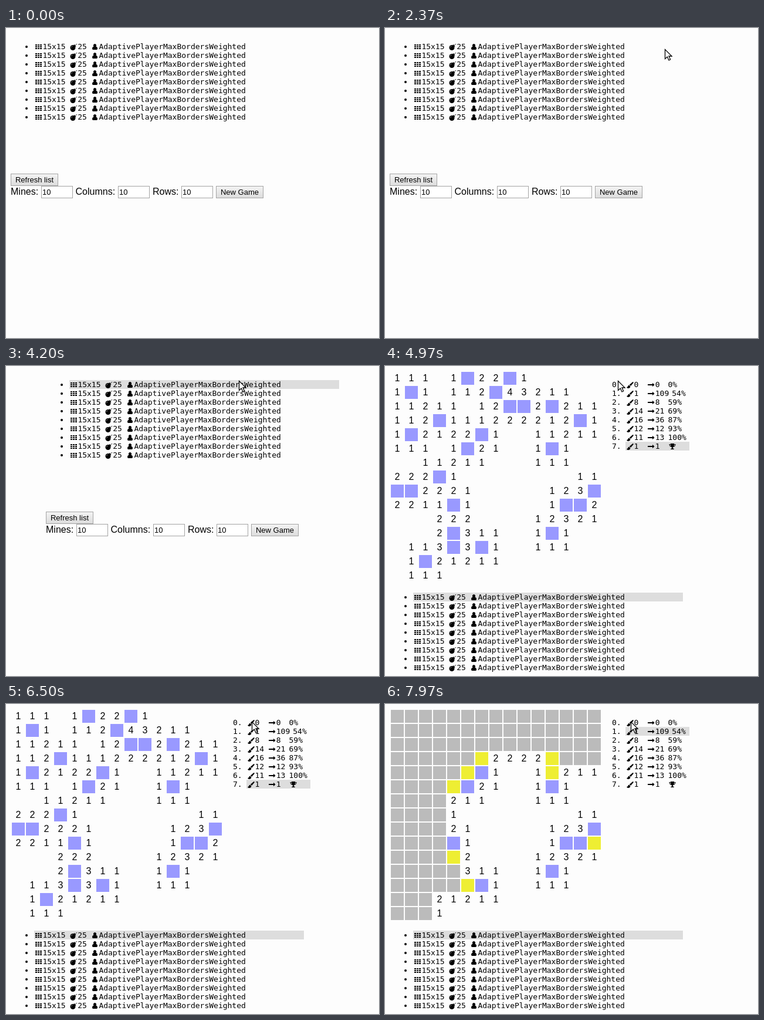
An HTML page for the animation above (8000 ms loop, 636 by 528 pixels).

```html
<!DOCTYPE html>
<html lang="en">
<head>
<meta charset="utf-8">
<title>Minesweeper replay</title>
<style>
  html, body { margin: 0; width: 100%; height: 100%; overflow: hidden; background: #fdfdfd; }
  svg { display: block; width: 636px; height: 528px; }
  text { font: 16px "Liberation Sans", Arial, sans-serif; white-space: pre; }
  .mono { font: 13px "DejaVu Sans Mono", monospace; }
  .small { font-size: 13px; }
  .mid { text-anchor: middle; }
  .mark { fill: #ddd; }
</style>
</head>
<body>
<svg id="stage" viewBox="0 0 636 528">
  <defs>
    <linearGradient id="face" x2="0" y2="1">
      <stop stop-color="#f4f4f4"/><stop offset="1" stop-color="#dcdcdc"/>
    </linearGradient>
    <path id="grid" d="M0 0h3v2H0zM4 0h3v2H4zM8 0h3v2H8zM0 3h3v2H0zM4 3h3v2H4zM8 3h3v2H8zM0 6h3v2H0zM4 6h3v2H4zM8 6h3v2H8z"/>
    <g id="bomb">
      <circle cx="4.5" cy="6.5" r="4.5"/>
      <path d="M6 2l3 3 1-1-3-3z"/>
      <path d="M8.5 2.5l1.5-1.5M10.5 .5h1" stroke="#000"/>
      <path d="M2 6q.3-2 2-2.3" fill="none" stroke="#ccc" stroke-width=".7"/>
    </g>
    <path id="user" d="M4.5 0a2.6 2.6 0 0 1 1.8 4.5Q9 5 9 8q0 2-1.5 2h-6Q0 10 0 8q0-3 2.7-3.5A2.6 2.6 0 0 1 4.5 0z"/>
    <path id="brush" d="M10.5 0q1.7 0 1.2 1.5L7 7 4.7 5zM4 5.6l2.4 2.1Q6 11 2.5 11 .6 11 0 9q1.5.2 2-1.2T4 5.6z"/>
    <path id="arrow" d="M0 3h8V.8L11.5 4 8 7.2V5H0z"/>
    <path id="trophy" d="M2.5 0h6v1H11q0 4-3.5 4.7L6.3 7v1.3q2 0 2.2 1.7h-6q.2-1.700 2.200-1.700V7L3.500 5.700Q0 5 0 1h2.500zM1 2q.3 1.700 1.800 2.400L2.500 2zm9 0H8.500l-.3 2.400Q9.700 3.700 10 2z"/>
  </defs>
</svg>
<script>
const LOOP = 8000, CLICK_GAME = 4200, GAME_READY = 4300, CLICK_START = 6600, NEXT_STEP = 7670;
const PLAYER = 'AdaptivePlayerMaxBordersWeighted';

// M mine, # covered, Y next safe cell
const solved = `
111.1M22M1.....
1M1.112M43211..
11211.12MM2M211
112M111222212M1
1M2122M1..11211
111.1M21..1M1..
..11211...111..
222M1........11
MM2221.....123M
2211M1.....1MM2
...222....12321
...2M311..1M1..
.113M3M1..111..
.1M21211.......
.111...........`;
const opened = `
###############
###############
###############
######Y2222Y###
#####YM1..1Y211
####YM21..1M1..
####211...111..
####1........11
####21.....123M
####M1.....1MMY
####Y2....12321
#####311..1M1..
#####YM1..111..
###21211.......
###1...........`;
const covered = solved.replace(/[^\n]/g, '#');

// clicks made, cells opened, progress
const steps = [[0, 0, '0%'], [1, 109, '54%'], [8, 8, '59%'], [14, 21, '69%'],
  [16, 36, '87%'], [12, 12, '93%'], [11, 13, '100%'], [1, 1, '']];

const text = (x, y, s, cls = '') => `<text x="${x}" y="${y}" class="${cls}">${s}</text>`;
const mono = (x, y, s) => text(x, y, s, 'mono');
const icon = (id, x, y) => `<use href="#${id}" x="${x}" y="${y}"/>`;
const rect = (x, y, w, h, attrs) => `<rect x="${x}" y="${y}" width="${w}" height="${h}" ${attrs}/>`;
const box = (x, y, w, fill) => rect(x + .5, y + .5, w - 1, 20, `fill="${fill}" stroke="#a4a4a4"`);
const button = (x, y, s) => box(x, y, 81, 'url(#face)') + text(x + 40.5, y + 15, s, 'small mid');
const field = (label, x, inputX) =>
  text(x, 284, label) + box(inputX, 269, 54, '#fff') + text(inputX + 2, 284, 10, 'small');

function gameRow(i) {
  const y = 24 + 15 * i;
  return `<circle cx="35" cy="${y + 8}" r="2"/>` +
    icon('grid', 50, y + 4) + mono(62.4, y + 12, '15x15') +
    icon('bomb', 109.5, y + 3) + mono(122.3, y + 12, 25) +
    icon('user', 147, y + 3) + mono(158.4, y + 12, PLAYER);
}

function stepRow([clicks, cells, progress], i) {
  const y = 24 + 15 * i;
  return mono(387, y + 12, i + '.') +
    icon('brush', 412, y + 3) + mono(424.5, y + 12, clicks) +
    icon('arrow', 448, y + 4) + mono(460.8, y + 12, cells) +
    (progress ? mono(cells > 99 ? 489.3 : 482.5, y + 12, progress) : icon('trophy', 484.5, y + 3));
}

function board(id, map) {
  const colors = { M: '#9999ff', '#': '#bbb', Y: '#eeee33' };
  const cells = map.trim().split('\n').map((row, r) => [...row].map((c, k) => {
    const x = 10 + 24 * k, y = 10 + 24 * r;
    if (c === '.') return '';
    return colors[c] ? rect(x, y, 22, 22, `fill="${colors[c]}"`) : text(x + 11, y + 16, c, 'mid');
  }).join(''));
  return `<g id="${id}">${cells.join('')}</g>`;
}

const stage = document.getElementById('stage');
stage.innerHTML += `
  <g id="lobby">
    ${rect(48, 24, 460, 15, 'id="chosen" class="mark"')}
    ${Array.from({ length: 9 }, (_, i) => gameRow(i)).join('')}
    ${button(8, 248, 'Refresh list')}
    ${field('Mines:', 8, 60)}${field('Columns:', 118.5, 191)}${field('Rows:', 250, 299)}
    ${button(358, 269, 'New Game')}
  </g>
  <g id="replay">
    ${board('solved', solved)}${board('covered', covered)}${board('opened', opened)}
    ${rect(410, 24, 109, 15, 'id="current" class="mark"')}
    ${steps.map(stepRow).join('')}
  </g>
  <path id="cursor" d="M.5.5V16.5L4.300 13l2.700 6 2.600-1.200-2.600-5.800H12z" fill="#fdfdfd" stroke="#000" stroke-width="1.3"/>`;

const $ = id => document.getElementById(id);
const show = (id, on) => $(id).setAttribute('display', on ? 'inline' : 'none');
const move = (id, x, y) => $(id).setAttribute('transform', `translate(${x} ${y})`);

// start, end, from, to
const moves = [
  [1880, 2370, [640, 110], [477, 36]],
  [2710, 3230, [477, 36], [397, 25]],
  [5700, 6200, [397, 25], [419, 30]]
];

function cursorAt(t) {
  const [start, end, from, to] = moves.findLast(m => t >= m[0]) || moves[0];
  const p = Math.min(1, Math.max(0, (t - start) / (end - start)));
  const eased = p * p * (3 - 2 * p);
  return from.map((v, i) => Math.round(v + (to[i] - v) * eased));
}

function draw(now) {
  const t = now % LOOP;
  const ready = t >= GAME_READY;
  const step = t < CLICK_START ? 7 : t < NEXT_STEP ? 0 : 1;
  show('chosen', t >= CLICK_GAME);
  show('replay', ready);
  show('solved', step === 7);
  show('covered', step === 0);
  show('opened', step === 1);
  move('lobby', t >= CLICK_GAME && !ready ? 60 : 0, ready ? 362 : 0);
  move('current', 0, 15 * step);
  move('cursor', ...cursorAt(t));
  requestAnimationFrame(() => draw(performance.now() - began));
}
const began = performance.now();
draw(0);
</script>
</body>
</html>
```
